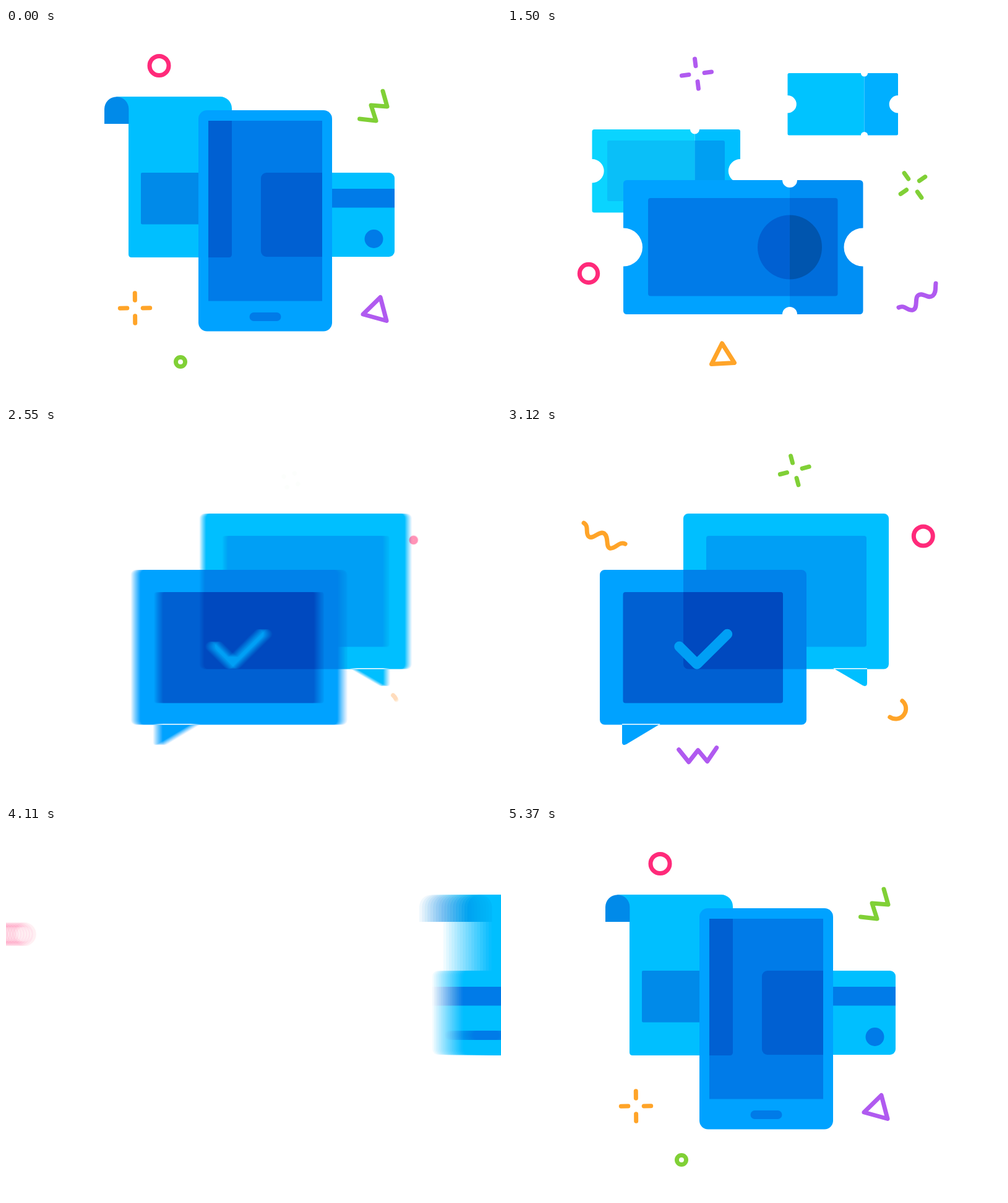
Write an HTML page with a canvas that moves like this. It is 800 px wide and 600 px high and loops after 5.4 s.

```html
<!DOCTYPE html>
<html lang="en">
<head>
<meta charset="utf-8">
<title>Phone, tickets, messages</title>
<style>
html, body { margin: 0; width: 100%; height: 100%; overflow: hidden; background: #fff; }
canvas { display: block; width: 800px; height: 600px; }
</style>
</head>
<body>
<canvas id="stage" width="800" height="600"></canvas>
<script>
const W = 800, H = 600, LOOP = 5400, STEP = 30;
const SHUTTER = 17, SAMPLES = 18, SLIDE = 400;
const PINK = '#ff2a7a', GREEN = '#80d036', ORANGE = '#ffa428', PURPLE = '#b05af0';

const view = document.getElementById('stage').getContext('2d');
const buffer = document.createElement('canvas');
buffer.width = W;
buffer.height = H;
const g = buffer.getContext('2d');

const clamp = v => Math.min(1, Math.max(0, v));

// Cubic bezier easing with control points (a, 0) and (b, 1)
function ease(a, b, x) {
  if (x <= 0) return 0;
  if (x >= 1) return 1;
  let lo = 0, hi = 1, s;
  for (let i = 0; i < 24; i++) {
    s = (lo + hi) / 2;
    const at = 3 * (1 - s) * (1 - s) * s * a + 3 * (1 - s) * s * s * b + s * s * s;
    if (at < x) lo = s; else hi = s;
  }
  return s * s * (3 - 2 * s);
}

// Horizontal offset: in from the right, later out to the left
function slide(t, enter, leave = enter + 1484) {
  return t < leave
    ? W * (1 - ease(.17, .2, (t - enter) / SLIDE))
    : -W * ease(.8, .83, (t - leave) / SLIDE);
}

function shifted(dx, draw) {
  g.save();
  g.translate(dx, 0);
  draw();
  g.restore();
}

function box(x, y, w, h, r) {
  const p = new Path2D();
  p.roundRect(x, y, w, h, r);
  return p;
}

function disc(x, y, r) {
  const p = new Path2D();
  p.arc(x, y, r, 0, 2 * Math.PI);
  return p;
}

function fill(path, color) {
  g.fillStyle = color;
  g.fill(path);
}

function joined(...paths) {
  const all = new Path2D();
  paths.forEach(p => all.addPath(p));
  return all;
}

/* ---- decorations ---- */

const svgPath = d => {
  const node = document.createElementNS('http://www.w3.org/2000/svg', 'path');
  node.setAttribute('d', d);
  return { path: new Path2D(d), length: node.getTotalLength() };
};

const ring = (color, x, y, r, start, leave) =>
  ({ color, x, y, start, leave, draw: k => g.stroke(disc(x, y, r * k)) });

const line = (color, x, y, d, start, leave) => {
  const { path, length } = svgPath(d);
  return { color, x, y, start, leave, draw(k) {
    g.setLineDash(k < 1 ? [length * k, length * 2] : []);
    g.stroke(path);
  } };
};

const sparkle = (color, x, y, tilt, start, leave) => ({ color, x, y, start, leave, draw(k, left) {
  g.translate(x, y);
  g.rotate((tilt - 60 * left) * Math.PI / 180);
  for (let i = 0; i < 4; i++) {
    g.beginPath();
    g.moveTo(12.7, 0);
    g.lineTo(12.7 + 11.5 * k, 0);
    g.stroke();
    g.rotate(Math.PI / 2);
  }
} });

const remaining = (t, start) => (1 - clamp((t - start) / 1050)) ** 2;

// Each mark fades in, grows, and drifts outward from the middle
function decorate(marks, t, pose) {
  for (const m of marks) {
    const age = t - m.start;
    if (age <= 0) continue;
    const left = remaining(t, m.start) - remaining(pose, m.start);
    const dx = m.x - 400, dy = m.y - 300, far = Math.hypot(dx, dy);
    const grow = 1 - (1 - clamp(age / 400)) ** 2;
    g.save();
    g.translate(slide(t, 0, m.leave) - dx / far * 21 * left, -dy / far * 21 * left);
    g.globalAlpha = clamp(age / 100);
    g.strokeStyle = m.color;
    g.lineWidth = 7;
    g.lineCap = g.lineJoin = 'round';
    m.draw(grow, left);
    g.restore();
  }
}

/* ---- phone, receipt and card ---- */

const receipt = new Path2D('M178 111H346A19 19 0 0 1 365 130V366Q365 371 360 371H203Q198 371 198 366V131Z');
const curl = new Path2D('M159 155V131A19.7 19.7 0 0 1 198.4 131V155Z');
const card = box(412, 234, 216, 136, 9);
const screen = box(327, 150, 184, 291.5, 0);

const phoneMarks = [
  ring(PINK, 247.5, 61, 15.5, 700, 1950),
  line(GREEN, 594, 126, 'M609 102L616 127L590 125L598 150L571.5 147', 740, 1930),
  sparkle(ORANGE, 208.5, 453, -.5, 730, 1950),
  line(PURPLE, 599, 457, 'M605 435.5L615 473.5L577 463Z', 720, 1935),
  ring(GREEN, 282, 540, 7.5, 720, 1945)
];

function phoneScene(t) {
  const rx = slide(t, 438), cx = slide(t, 376), px = slide(t, 441);
  shifted(rx, () => {
    fill(receipt, '#00bfff');
    fill(curl, '#008ae9');
    fill(box(218, 234, 127, 83.5, 2), '#008ae9');
  });
  shifted(cx, () => {
    fill(card, '#00bfff');
    fill(box(412, 260, 216, 30.5, 0), '#007be8');
    fill(box(432, 331, 88, 15, 7.5), '#007be8');
    fill(disc(594.5, 341, 15), '#007be8');
  });
  shifted(px, () => {
    fill(box(311, 133, 216, 357.5, 14), '#00a2ff');
    fill(screen, '#007be8');
    fill(box(393.5, 460, 51, 14, 7), '#007be8');
    g.clip(screen);
    shifted(rx - px, () => { fill(receipt, '#0060d2'); fill(curl, '#0060d2'); });
    shifted(cx - px, () => fill(card, '#0060d2'));
  });
  decorate(phoneMarks, t, 1800);
}

/* ---- tickets ---- */

function ticketShape(x, y, w, h, split, side, notch, r) {
  const p = new Path2D(), q = Math.PI / 2, mid = y + h / 2, x2 = x + w, y2 = y + h;
  p.moveTo(x + r, y);
  p.arc(split, y, notch, 2 * q, 0, true);
  p.arcTo(x2, y, x2, mid, r);
  p.arc(x2, mid, side, -q, q, true);
  p.arcTo(x2, y2, split, y2, r);
  p.arc(split, y2, notch, 0, 2 * q, true);
  p.arcTo(x, y2, x, mid, r);
  p.arc(x, mid, side, q, -q, true);
  p.arcTo(x, y, x + r, y, r);
  p.closePath();
  return p;
}

// Side notches need their own straight edge pieces, so they are cut with an even-odd mask
function notched(x, y, w, h, split, side, notch, r) {
  const body = box(x, y, w, h, r), mid = y + h / 2;
  const holes = [[x, mid, side], [x + w, mid, side], [split, y, notch], [split, y + h, notch]];
  return { body, split, holes: holes.map(c => joined(box(-W, -H, 3 * W, 3 * H, 0), disc(...c))) };
}

function twoTone(path, split, left, right) {
  [[-W, left], [split, right]].forEach(([from, color]) => {
    g.save();
    g.beginPath();
    g.rect(from, 0, from < split ? split - from : W, H);
    g.clip();
    fill(path, color);
    g.restore();
  });
}

function ticket(dx, shape, left, right, inside) {
  shifted(dx, () => {
    shape.holes.forEach(hole => g.clip(hole, 'evenodd'));
    twoTone(shape.body, shape.split, left, right);
    if (inside) inside(shape.split);
  });
}

const smallTicket = notched(453.5, 73, 178.5, 100.5, 577.5, 14.3, 5.6, 2.5);
const midTicket = notched(137.5, 164, 239.5, 134.5, 303.5, 19.2, 7.5, 3.5);
const bigTicket = notched(188, 246, 387.5, 217, 457, 31, 12, 5.5);

const ticketMarks = [
  sparkle(PURPLE, 306.5, 74, -7, 720, 1945),
  sparkle(GREEN, 656, 254.5, -35, 730, 1930),
  ring(PINK, 132, 397, 14.7, 720, 1960),
  line(ORANGE, 348, 531, 'M347.5 510L367.5 541.5L330.5 543.5Z', 740, 1945),
  line(PURPLE, 664, 435, 'M633 452C643 447 647 458 656 456C665 453 658 436 665 432C673 427 680 439 688 433C694 428 692 420 693 413', 750, 1930)
];

function ticketScene(t) {
  ticket(slide(t, 400), smallTicket, '#00c3ff', '#00afff');
  ticket(slide(t, 500), midTicket, '#0ad4ff', '#00bfff', split =>
    twoTone(box(162, 182, 190, 98, 3), split, '#0abff8', '#009ff2'));
  ticket(slide(t, 428), bigTicket, '#00a2ff', '#008ff4', split => {
    twoTone(box(228, 275, 306.5, 158.5, 4), split, '#007be8', '#006ddb');
    twoTone(disc(457, 354.5, 52), split, '#0060d2', '#0055ae');
  });
  decorate(ticketMarks, t, 1500);
}

/* ---- messages ---- */

const backBubble = joined(box(285, 140, 332, 251.5, 8), new Path2D('M527 390L575 418Q582 421 582 414V390Z'));
const frontBubble = joined(box(150, 231, 334, 250.5, 8), new Path2D('M186 480V511Q187 516 193 513L248 480Z'));
const frontPanel = box(187.5, 267, 258.5, 179.5, 4);
const tick = new Path2D('M278.5 355L307 383.5L356 335');

const messageMarks = [
  ring(PINK, 676, 175, 15.5, 700, 1954),
  line(ORANGE, 633, 459, 'M642 445.1A16.5 16.5 0 0 1 622 471.3', 720, 1944),
  sparkle(GREEN, 466, 66, -2, 755, 1944),
  line(ORANGE, 153, 174, 'M120 153C129 158 122 170 128 175C135 181 145 165 153 170C161 176 155 191 162 194C171 196 177 182 187 187', 760, 1960),
  line(PURPLE, 306, 535, 'M276 526L292 546L307 527L322 545L337 523', 760, 1930)
];

function messageScene(t) {
  const bx = slide(t, 454, 1930), fx = slide(t, 486, 1975);
  shifted(bx, () => {
    fill(backBubble, '#00bfff');
    fill(box(322, 176, 259, 179.5, 4), '#009ff5');
  });
  shifted(fx, () => {
    fill(frontBubble, '#00a2ff');
    g.clip(frontBubble);
    shifted(bx - fx, () => fill(backBubble, '#0082ea'));
    fill(frontPanel, '#0060d2');
    g.clip(frontPanel);
    shifted(bx - fx, () => fill(backBubble, '#0049bf'));
    g.strokeStyle = '#009ff5';
    g.lineWidth = 16.5;
    g.lineCap = g.lineJoin = 'round';
    g.stroke(tick);
  });
  decorate(messageMarks, t, 1800);
}

/* ---- timeline ---- */

const scenes = [[ticketScene, 0], [messageScene, 1800], [phoneScene, 3600]];

function paint(t) {
  g.fillStyle = '#fff';
  g.fillRect(0, 0, W, H);
  for (const [draw, base] of scenes) {
    const local = (t - base + 2 * LOOP) % LOOP;
    if (local > 300 && local < 2450) draw(local);
  }
}

// Average several moments within the shutter time while things slide
function render(t) {
  const phase = t % 1800;
  const count = phase > 50 && phase < 960 ? SAMPLES : 1;
  for (let i = 0; i < count; i++) {
    paint(t + SHUTTER * ((i + .5) / count - .5));
    view.globalAlpha = 1 / (i + 1);
    view.drawImage(buffer, 0, 0);
  }
}

let shown = -1;
function tickFrame() {
  const t = Math.floor(performance.now() % LOOP / STEP) * STEP;
  if (t !== shown) render(shown = t);
  requestAnimationFrame(tickFrame);
}
tickFrame();
</script>
</body>
</html>
```
